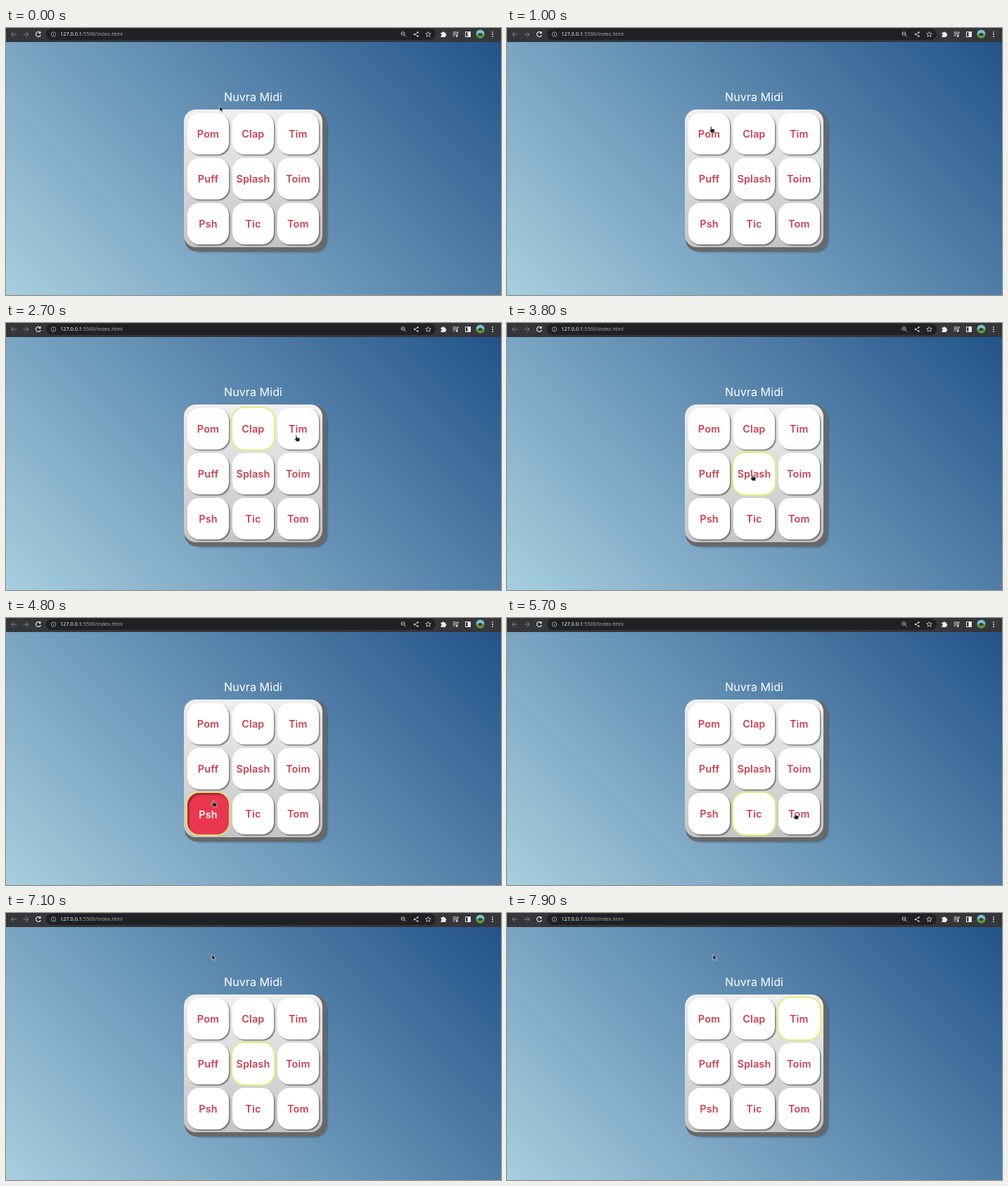
These frames come from a looping animation (704 px wide and 380 px high, 8 s). An HTML page:

```html
<!DOCTYPE html>
<html lang="pt">
<head>
<meta charset="utf-8">
<title>Nuvra Midi</title>
<style>
html, body { margin: 0; width: 100%; height: 100%; overflow: hidden; }
body { position: relative; background: #35363a; font-family: Inter, sans-serif; }
#page { position: absolute; inset: 19.5px 0 0; background: linear-gradient(45deg, #a7cfdf, #23538a); }
#bar, #cursor { position: absolute; left: 0; top: 0; }
#bar { font: 500 7.35px "Open Sans", sans-serif; }
#cursor { overflow: visible; }
h1 {
  position: absolute; left: 0; top: 88px; width: 703px; margin: 0;
  font-size: 16px; font-weight: 400; line-height: 20px; letter-spacing: .1px;
  text-align: center; color: #fff;
}
#pad {
  position: absolute; left: 253px; top: 116px; width: 197px; height: 196px; border-radius: 17px;
  background: linear-gradient(#f0eff0, #c4c4c4);
  box-shadow: 1px 6px #686868, 6px 1px #686868, 6px 6px #686868, 7px 7px 3px #0005;
}
.key {
  position: absolute; width: 59px; height: 59px; border-radius: 17px;
  background: #fff; color: #cd4155; box-shadow: 1.5px 1.5px 1.5px #0007;
  font-size: 14.4px; font-weight: 600; line-height: 59px; letter-spacing: .15px; text-align: center;
}
.focus { box-shadow: 0 0 1px 2px #e4eb7c; }
.down {
  background: #e9374f; color: #fff; line-height: 62px;
  box-shadow: 0 0 1px 2px #e4e06c, inset 2px 2px 3px #0006;
}
</style>
</head>
<body>
<div id="page"></div>
<svg id="bar" width="704" height="19" fill="none" stroke="#e4e5e7">
  <rect x="57" y="1" width="554" height="16" rx="8" fill="#202124" stroke="none"/>
  <path d="M15 9H8M11 5.5L7.5 9l3.5 3.500M24.5 9h7M28.500 5.5L32 9l-3.5 3.500" stroke="#85878b"/>
  <path d="M48.500 6.500a3.500 3.500 0 1 0 .8 3.500" stroke-width="1.2"/>
  <path d="M49.500 4.500v3.500h-3.500z" fill="#e4e5e7" stroke="none"/>
  <g stroke="#b6b8bc" stroke-width=".8">
    <circle cx="67.500" cy="9" r="3.300"/>
    <path d="M67.500 8.500v2.300M67.500 6.800v.8"/>
  </g>
  <text x="77" y="11.200" stroke="none" fill="#adafb2"><tspan fill="#fff">127.0.0.1</tspan>:5500/index.html</text>
  <g stroke="#c6c8cb" stroke-width=".9">
    <circle cx="564.500" cy="8" r="2.500"/>
    <path d="M566.500 10l2.500 2.500M563.300 8h2.400M585.500 6.500L581 9l4.500 2.500"/>
    <path d="M600.500 5.200l1.100 2.500 2.700.2-2.100 1.800.7 2.600-2.400-1.400-2.400 1.400.7-2.600-2.100-1.800 2.700-.2z"/>
  </g>
  <g fill="#c6c8cb" stroke="none">
    <circle cx="585.500" cy="6.300" r="1.200"/><circle cx="581" cy="9" r="1.200"/><circle cx="585.500" cy="11.700" r="1.200"/>
  </g>
  <g fill="#f1f1f1" stroke="none">
    <path d="M618.500 6.500h2a1.300 1.300 0 1 1 2.600 0h2v2a1.300 1.300 0 1 1 0 2.600v2h-6.600v-2a1.300 1.300 0 0 0 0-2.600z"/>
    <circle cx="641" cy="11.500" r="1.300"/>
    <path d="M656.500 6h4v6.500h-4z"/>
    <circle cx="692" cy="5.800" r=".9"/><circle cx="692" cy="9" r=".9"/><circle cx="692" cy="12.200" r=".9"/>
  </g>
  <path d="M635.500 6h5.500M635.500 8.500h5.500M635.500 11h3M642 11.500V6h2"/>
  <rect x="653.500" y="5.500" width="7" height="7"/>
  <g stroke="none">
    <circle cx="674.500" cy="8.500" r="6" fill="#79c3d3"/>
    <path d="M668.500 8.500a6 6 0 0 0 12 0z" fill="#5a9a3d"/>
    <ellipse cx="674.500" cy="9" rx="3" ry="2" fill="#34433a"/>
  </g>
</svg>
<h1>Nuvra Midi</h1>
<div id="pad"></div>
<svg id="cursor" width="10" height="12" stroke="#fff" stroke-width=".6" stroke-linejoin="round">
  <path id="arrow" fill="#111" d="M0 0v8l1.900-1.700 1.300 2.900 1.300-.6-1.300-2.800h2.500z"/>
  <path id="hand" fill="#222" d="M-1 .7q1-1 1.700 0v3l3.500.7q1 .3.800 1.600l-.7 3.700h-4.300l-3-3.700q.2-1.200 1.300-.6l.7.600z"/>
</svg>
<script>
const LOOP = 8000, STEP = 100, HOLD = 60, PITCH = 63.9;
const $ = id => document.getElementById(id);
const clamp = (v, lo, hi) => Math.min(hi, Math.max(lo, v));

const keys = ["Pom", "Clap", "Tim", "Puff", "Splash", "Toim", "Psh", "Tic", "Tom"].map((name, i) => {
  const key = document.createElement("div");
  key.textContent = name;
  key.style.left = 5 + i % 3 * PITCH + "px";
  key.style.top = 5 + Math.floor(i / 3) * PITCH + "px";
  return $("pad").appendChild(key);
});

// One click per key, in order: time, x, y
const clicks = [
  [1580, 285, 151], [2230, 348, 160], [2880, 413, 159],
  [3280, 290, 215], [3680, 349, 215], [4030, 412, 215],
  [4780, 295, 259], [5330, 357, 277], [5880, 410, 277]
];
const BLUR = 6500, TAB = 6700;

// The pointer reaches a key shortly before its click; a new row takes longer
const moves = clicks.map(([t, x, y], i) => {
  const end = Math.round((t - 180) / STEP) * STEP, travel = i % 3 ? 100 : 300;
  return { start: i ? Math.max(end - travel, clicks[i - 1][0] + HOLD) : 0, end, x, y };
});
moves.push({ start: 6000, end: 6300, x: 321, y: 83 }, { start: 6300, end: BLUR, x: 293, y: 59 });

function pointer(t) {
  let x = 304, y = 111;
  for (const m of moves) {
    const p = clamp((t - m.start) / (m.end - m.start), 0, 1);
    x += (m.x - x) * p;
    y += (m.y - y) * p;
  }
  return [x, y];
}

function focusAt(t) {
  if (t < BLUR) return clicks.findLastIndex(click => click[0] <= t);
  if (t < TAB) return -1;
  // Tab runs along the first row, pauses, then goes once around
  return (clamp((t - TAB) / 50, 0, 2) + clamp((t - 6900) / STEP, 0, 9)) % 9;
}

const inKey = d => d >= 0 && d < 3 * PITCH && d % PITCH < 59;

function draw(now) {
  const t = Math.floor(now % LOOP / STEP) * STEP;
  const active = focusAt(t), down = t < BLUR && active >= 0 && t < clicks[active][0] + HOLD;
  keys.forEach((key, i) => {
    key.className = "key" + (i === active ? " focus" + (down ? " down" : "") : "");
  });

  const [x, y] = pointer(t), over = inKey(x - 258) && inKey(y - 121);
  $("cursor").style.transform = `translate(${x}px, ${y}px)`;
  $("hand").style.display = over ? "" : "none";
  $("arrow").style.display = over ? "none" : "";
}

const start = performance.now();
function tick() {
  draw(performance.now() - start);
  requestAnimationFrame(tick);
}
tick();
</script>
</body>
</html>
```
